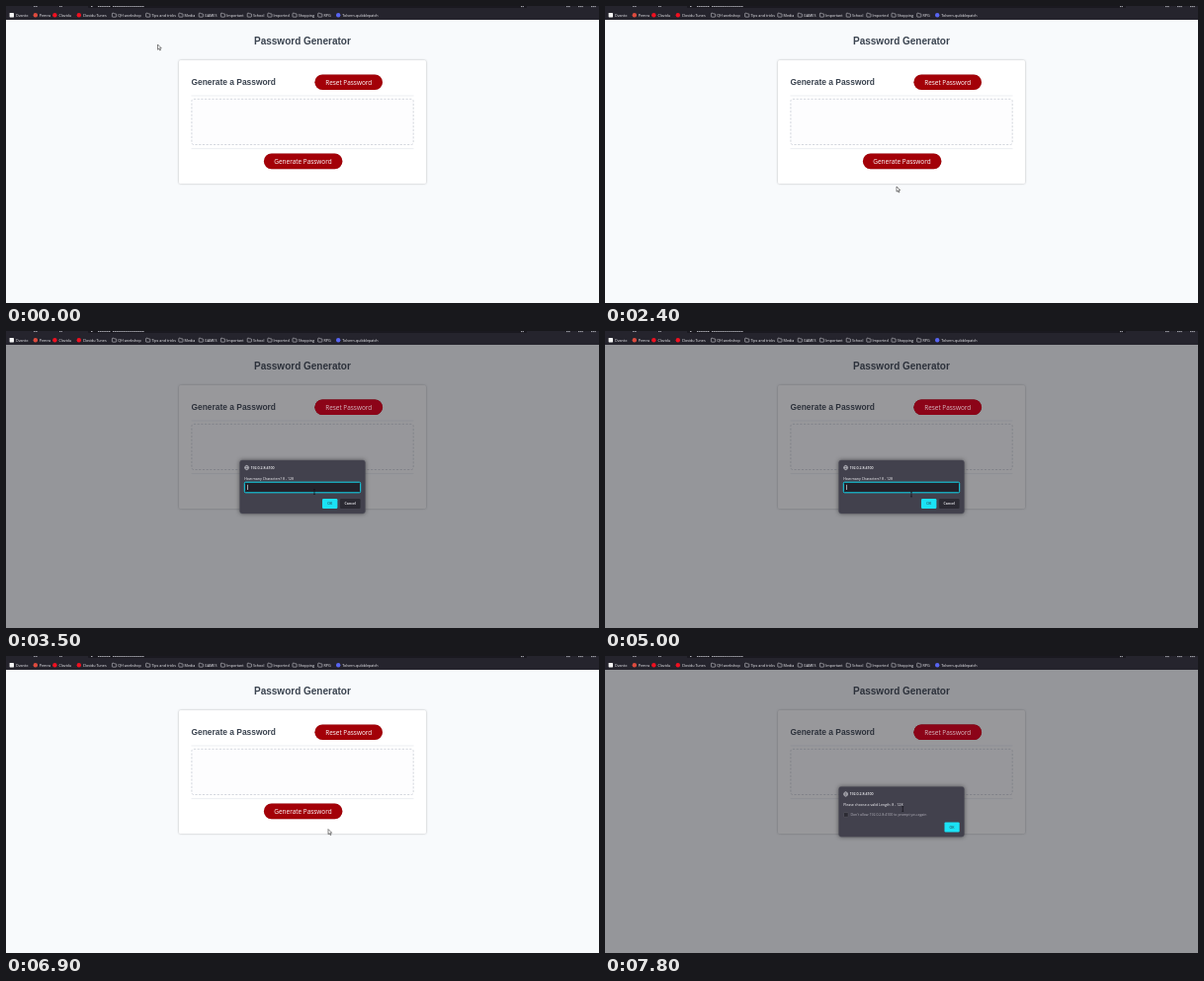
Write an HTML page that moves like this. It is 600 by 301 pixels and loops after 8 s.

```html
<!DOCTYPE html>
<html lang="en">
<head>
<meta charset="utf-8">
<title>Password Generator</title>
<style>
  html, body { margin: 0; width: 100%; height: 100%; overflow: hidden; background: #f8fafc; }
  svg { display: block; width: 600px; height: 301px; font-family: "Open Sans", sans-serif; }
  .head { font-family: "Liberation Sans", Arial, sans-serif; font-weight: 700; fill: #3b4450; }
  .btn { font-size: 6.43px; text-anchor: middle; fill: #fff; }
  .ui { font-size: 3.56px; fill: #fbfbfe; }
  .mid { text-anchor: middle; }
  .mark { font-size: 3.7px; fill: #f4f4f8; }
  .line { stroke: #dfe3e8; stroke-width: .6; }
  .panel { fill: #42414d; stroke: #55545f; stroke-width: .4; filter: drop-shadow(0 .8px 2px #0007); }
  .globe { fill: none; stroke: #d8d8de; stroke-width: .5; }
  .arrow { fill: #fff; stroke: #222; stroke-width: .55; stroke-linejoin: round; }
  .beam { fill: none; stroke: #15141a; stroke-width: .7; }
</style>
</head>
<body>
<svg viewBox="0 0 600 301">
  <defs>
    <path id="folder" d="M.4 1.1q0-.6.6-.6h1l.6.7h1.5q.5 0 .5.5v2.2q0 .5-.5.5H.9q-.5 0-.5-.5z" fill="none" stroke="#e6e6ec" stroke-width=".5"/>
    <g id="globe" class="globe">
      <circle r="2.1"/><ellipse rx=".9" ry="2.1"/><path d="M-2.1 0h4.2"/>
    </g>
  </defs>

  <rect width="600" height="301" fill="#f8fafc"/>

  <text class="head" x="251" y="39.4" font-size="10">Password Generator</text>
  <rect x="175" y="55" width="250" height="125" rx="1.6" fill="#fff" style="filter: drop-shadow(0 .6px 1.3px #0004)"/>
  <text class="head" x="187.5" y="79.9" font-size="8.42">Generate a Password</text>
  <path class="line" d="M187.5 91h225M187.5 144.6h225"/>
  <rect x="187.9" y="94.3" width="224.3" height="46.2" rx="2" fill="#fdfdfe" stroke="#c3c8d1" stroke-width=".7" stroke-dasharray="2.2 1.5"/>
  <g style="filter: drop-shadow(0 .4px .6px #0003)" fill="#a30108">
    <rect x="312.4" y="69.4" width="68.6" height="15.7" rx="7.8"/>
    <rect x="260.9" y="149.5" width="79.5" height="15.7" rx="7.8"/>
  </g>
  <text class="btn" x="346.7" y="79.6">Reset Password</text>
  <text class="btn" x="300.5" y="159.7">Generate Password</text>

  <g id="dim">
    <rect y="14" width="600" height="287" fill="#1c1b22" fill-opacity=".45"/>
    <rect x="312.4" y="69.4" width="68.6" height="15.7" rx="7.8" fill="#8c0418"/>
    <text class="btn" x="346.7" y="79.6" style="fill: #d6b9c0">Reset Password</text>
  </g>

  <g id="bar">
    <rect width="600" height="14" fill="#25242d"/>
    <rect x="83" y="-2" width="444" height="4" rx="1" fill="#1a1920"/>
    <path d="M28 .4h4M54 .4h3M86 .5h2M93 .5h13M108 .5h32M521 .6h3M567 .6h4M579 .6h5M592 .6h5" stroke="#bdbdc6" stroke-width=".9" stroke-dasharray="1.5 .6"/>
  </g>

  <g id="prompt">
    <rect class="panel" x="236.5" y="131" width="127" height="54" rx="2.4"/>
    <use href="#globe" x="243.6" y="138.5"/>
    <text class="ui" x="247.5" y="139.8" font-weight="600">192.0.2.8:4100</text>
    <text class="ui" x="241.2" y="150.7">How many Characters? 8 - 128</text>
    <rect x="241.3" y="153.2" width="117.4" height="10.6" rx="1.2" fill="#23222b" stroke="#12d8ee"/>
    <text class="ui" id="digit" x="244" y="159.8">4</text>
    <rect id="caret" y="155.8" width=".6" height="5.2" fill="#fbfbfe"/>
    <rect id="ok" x="320" y="170" width="15.4" height="10" rx="1.2"/>
    <text class="ui mid" x="327.7" y="176.3" style="fill: #2b2a33">OK</text>
    <rect x="338" y="170" width="20.6" height="10" rx="1.2" fill="#2b2a33"/>
    <text class="ui mid" x="348.3" y="176.3" font-weight="600">Cancel</text>
  </g>

  <g id="alert">
    <rect class="panel" x="236.5" y="132.5" width="127" height="50.7" rx="2.4"/>
    <use href="#globe" x="243.6" y="140"/>
    <text class="ui" x="247.5" y="141.3" font-weight="600">192.0.2.8:4100</text>
    <text class="ui" x="241.2" y="152.3">Please choose a valid Length: 8 - 128</text>
    <rect x="241.5" y="158.6" width="4.6" height="4.6" rx=".6" fill="#2b2a33" stroke="#6b6a75" stroke-width=".4"/>
    <text class="ui" x="248.4" y="162.2" style="fill: #b3b2bb; font-size: 3.5px">Don't allow 192.0.2.8:4100 to prompt you again</text>
    <rect x="343.5" y="168.4" width="15.2" height="10.1" rx="1.2" fill="#1be2f5"/>
    <text class="ui mid" x="351.1" y="174.7" style="fill: #2b2a33">OK</text>
  </g>

  <g id="cursor">
    <path class="arrow" id="arrow" d="M0 0v5.2l1.2-1.1.9 1.9.9-.4-.9-1.9h1.6z"/>
    <path class="arrow" id="hand" d="M-.5.4q.5-.7 1 0v2l2.2.6q.6.2.5.8l-.5 2.4H.2L-1.5 4q0-.8 1 0z"/>
    <path class="beam" id="beam" d="M-.9-2.4h1.8M0-2.4v4.8M-.9 2.4h1.8"/>
  </g>
</svg>

<script>
const LOOP = 8000, STEP = 100;
const $ = id => document.getElementById(id);
const show = (id, on) => $(id).setAttribute('visibility', on ? 'visible' : 'hidden');
const within = (t, a, b) => t >= a && t < b;

// x, label, icon colour and corner radius; a folder when no colour is given
const bookmarks = [
  [3.6, 'Ovanto', '#f4f4f4', .6], [27.6, 'Pemra', '#dd4b3e', 2.2],
  [47.2, 'Clovidu', '#f01020', 2.2], [71.6, 'Clovidu Tunes', '#f01020', 2.2],
  [107, 'QH workshop'], [141.2, 'Tips and tricks'], [174.4, 'Media'],
  [194.8, 'GAMES'], [217, 'Important'], [243.8, 'School'], [264.4, 'Imported'],
  [289.6, 'Shopping'], [315.3, 'RPG'],
  [334, 'Tolvern-quibblepatch', '#5865f2', 2.2]
];
$('bar').innerHTML += bookmarks.map(([x, label, color, r]) =>
  (color ? `<rect x="${x}" y="7" width="4.4" height="4.4" rx="${r}" fill="${color}"/>`
         : `<use href="#folder" x="${x}" y="6.7"/>`) +
  `<text class="mark" x="${x + 6.2}" y="10.7">${label}</text>`).join('');

// time, x, y of the pointer's hot spot
const path = [
  [0, 153.5, 39], [300, 330, 105], [500, 335, 153], [600, 335, 153],
  [1000, 496, 130], [1250, 430, 191], [1500, 341, 190],
  [2000, 310, 224], [2400, 295, 183], [2900, 312.5, 158], [3300, 312.5, 158],
  [3500, 312, 163], [4200, 312, 163], [4600, 328, 173], [5000, 310, 165.5],
  [6100, 310, 165.5], [6700, 326, 175.5], [7300, 326, 175.5], [7800, 301.3, 155]
];

function pointer(t) {
  const i = path.findIndex(p => p[0] > t);
  if (i < 0) return path[path.length - 1].slice(1);
  const [a, ax, ay] = path[i - 1], [b, bx, by] = path[i];
  const u = (t - a) / (b - a), k = u * u * (3 - 2 * u);
  return [ax + (bx - ax) * k, ay + (by - ay) * k];
}

function draw(t) {
  const asking = within(t, 3400, 6900), warning = t >= 7000;
  const typed = t >= 6000;
  const [x, y] = pointer(t);

  show('dim', asking || warning);
  show('prompt', asking);
  show('alert', warning);
  show('digit', asking && typed);
  show('caret', asking && !within(t, 4100, 4600) && !within(t, 5200, 5600) && !within(t, 6300, 6700));
  $('caret').setAttribute('x', typed ? 246.2 : 244);
  $('ok').setAttribute('fill', within(t, 6600, 6900) ? '#80ebff' : '#1be2f5');

  const beam = (asking && y < 167) || (warning && y < 158);
  const hand = within(t, 2900, 3400);
  show('beam', beam);
  show('hand', hand);
  show('arrow', !beam && !hand);
  $('cursor').setAttribute('transform', `translate(${x} ${y})`);
}

const start = performance.now();
function tick() {
  const t = (performance.now() - start) % LOOP;
  draw(Math.floor(t / STEP) * STEP);
  requestAnimationFrame(tick);
}
tick();
</script>
</body>
</html>
```
